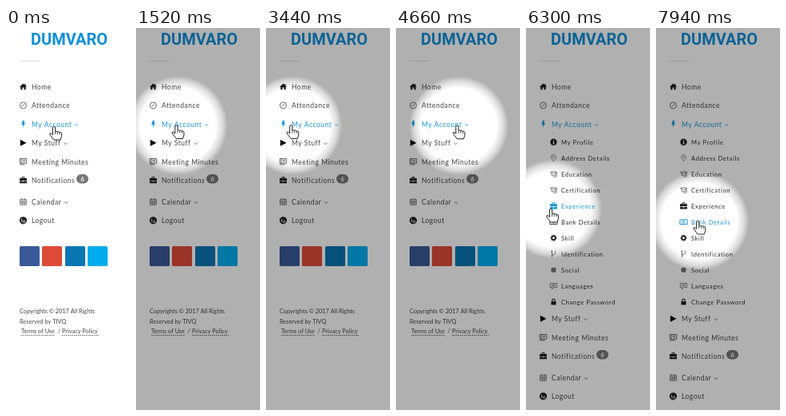
Animation, 155 px wide and 478 px high, one loop 8000 ms. Source, as an HTML page with a canvas:

```html
<!DOCTYPE html>
<html lang="en">
<head>
<meta charset="utf-8">
<title>Side menu tour</title>
<style>
  html, body { margin: 0; width: 100%; height: 100%; overflow: hidden; background: #fff; }
  canvas { display: block; width: 155px; height: 478px; }
</style>
</head>
<body>
<canvas id="stage"></canvas>
<script>
const W = 155, H = 478, LOOP = 8000;
const HOLD = 136.5, FADE_AT = 20;
const BLUE = '#1795d4', INK = '#454545', DARK = '#1c1c1c';
const canvas = document.getElementById('stage');
const ctx = canvas.getContext('2d');
const dpr = window.devicePixelRatio || 1;
canvas.width = W * dpr;
canvas.height = H * dpr;

const clamp = v => Math.max(0, Math.min(1, v));
const smooth = k => k * k * (3 - 2 * k);

// The pointer sways over one menu entry, then travels down the open submenu
const SWAY = { from: 1760, to: 3880, period: 1060, x: 54, reach: 36, fade: 5000, y: 121.5 };
const STOPS = [
  { t: 0, x: 60, y: 123 }, { t: 600, x: 37, y: 120 }, { t: 1360, x: 50, y: 121.5 },
  { t: SWAY.from, x: 90, y: SWAY.y }, { t: SWAY.to, x: 77, y: SWAY.y }, { t: 5350, x: 76, y: 122 },
  { t: 5760, x: 24, y: 135 }, { t: 6300, x: 31, y: 226 }, { t: 6500, x: 34, y: 240 },
  { t: 6990, x: 88, y: 242 }, { t: 7780, x: 45, y: 241 }, { t: LOOP, x: 54, y: 241 }
];

function pointer(t) {
  if (t >= SWAY.from && t < SWAY.to) {
    const s = t - SWAY.from;
    const swing = SWAY.reach * Math.exp(-s / SWAY.fade);
    return { x: SWAY.x + swing * Math.cos(2 * Math.PI * s / SWAY.period), y: SWAY.y };
  }
  const i = STOPS.findIndex(s => s.t > t);
  const a = STOPS[i - 1], b = STOPS[i];
  const k = smooth((t - a.t) / (b.t - a.t));
  return { x: a.x + (b.x - a.x) * k, y: a.y + (b.y - a.y) * k };
}

// Draws a label and returns its right end
function text(s, x, y, font, color, gap = 0) {
  ctx.font = font;
  ctx.letterSpacing = gap + 'px';
  ctx.fillStyle = color;
  ctx.fillText(s, x, y);
  return x + ctx.measureText(s).width;
}

function fill(d, color) { ctx.fillStyle = color; ctx.fill(new Path2D(d)); }
function line(d, color, w = 0.8) {
  ctx.strokeStyle = color;
  ctx.lineWidth = w;
  ctx.stroke(new Path2D(d));
}
function disc(x, y, r, color) {
  ctx.fillStyle = color;
  ctx.beginPath();
  ctx.arc(x, y, r, 0, 7);
  ctx.fill();
}
function ring(x, y, r, color, w = 0.8) {
  ctx.strokeStyle = color;
  ctx.lineWidth = w;
  ctx.beginPath();
  ctx.arc(x, y, r, 0, 7);
  ctx.stroke();
}
function box(x, y, w, h, r, color) {
  ctx.fillStyle = color;
  ctx.beginPath();
  ctx.roundRect(x, y, w, h, r);
  ctx.fill();
}

// Icons are drawn around 0,0
const icons = {
  home: c => fill('M-4.6 .3L0-4 1.8-2.3V-3.6H3V-1.2L4.6 .3H3.2V3.8H1V1H-1V3.8H-3.2V.3Z', c),
  gauge: c => { ring(0, 0, 4, c); line('M-1.6 1.2L2-1.6', c); },
  bolt: c => fill('M-.6-4.5H1.8L.8-1.6H2.6L-1 4.6-.2 .4H-2.2Z', c),
  play: c => fill('M-3.6-4L4 0-3.6 4Z', c),
  board: c => line('M-4.2-3.6H4.2V2.2H-4.2ZM-2.4-3.6V2.2M-.8-1.8H2.8M-.8 0H2.8M-4.2 3.8H2', c),
  bag: c => {
    line('M-1.6-2.4V-3.8H1.6V-2.4', c, 1);
    fill('M-4.5-2.5H4.5V.4H-4.5ZM-4.5 1H-1V1.8H1V1H4.5V3.8H-4.5Z', c);
  },
  calendar: c => line('M-3.8-3H3.8V3.8H-3.8ZM-3.8-1H3.8M-3.8 1.3H3.8M-1.3-1V3.8M1.3-1V3.8M-2-4.2V-2.4M2-4.2V-2.4', c, 0.7),
  exit: c => { disc(0, 0, 4.6, c); line('M-1.8-2V2M.2 .6A1.4 1.4 0 1 0 .3 .5', '#fff', 0.9); },
  info: c => { disc(0, 0, 4.2, c); line('M0-2.7V-1.4M-.9-.5H.1V2.3M-1.1 2.3H1.2', '#fff', 1); },
  pin: c => { line('M0 4.2C-1 2-3 .6-3-1.2A3 3 0 0 1 3-1.2C3 .6 1 2 0 4.2Z', c, 0.7); ring(0, -1.2, 1, c, 0.6); },
  cap: c => line('M-4.3-2.2L0-3.4 4.3-2.2 0-.8ZM-2.4-1.4V1.6H2.6V-1.4M3.7-2V3.4H-1', c, 0.7),
  cash: c => { line('M-4.6-2.8H4.6V2.8H-4.6Z', c, 1); ring(0, 0, 1.3, c, 1); },
  gear: c => {
    ring(0, 0, 2.3, c, 1.7);
    for (let a = 0; a < 6; a += Math.PI / 4) disc(Math.cos(a) * 3.3, Math.sin(a) * 3.3, 0.8, c);
  },
  fork: c => line('M-2-4V4M-2 1.2C1 1.2 2.2 0 2.2-3.6M-3.2-3L-2-4', c, 0.9),
  dot: c => disc(0, 0, 3.2, c),
  bubble: c => line('M-4.2-3.2H4.2V2H0L-2 4V2H-4.2ZM-2.4-1.4H2.4M-2.4 .3H2.4', c, 0.7),
  lock: c => { line('M-1.7-.4V-2A1.7 1.7 0 0 1 1.7-2V-.4', c, 1.1); fill('M-3-.6H3V3.7H-3Z', c); }
};

function icon(name, x, y, color) {
  ctx.save();
  ctx.translate(x, y);
  icons[name](color);
  ctx.restore();
}

const MENU = [
  { icon: 'home', label: 'Home', tint: DARK },
  { icon: 'gauge', label: 'Attendance' },
  { icon: 'bolt', label: 'My Account', tint: BLUE, ink: BLUE, arrow: true },
  { icon: 'play', label: 'My Stuff', tint: '#000', arrow: true },
  { icon: 'board', label: 'Meeting Minutes' },
  { icon: 'bag', label: 'Notifications', tint: DARK, badge: '6' },
  { icon: 'calendar', label: 'Calendar', arrow: true },
  { icon: 'exit', label: 'Logout', tint: DARK }
];
const SUB = [
  ['info', 'My Profile', DARK], ['pin', 'Address Details', '#666'], ['cap', 'Education', '#555'],
  ['cap', 'Certification', '#555'], ['bag', 'Experience', DARK], ['cash', 'Bank Details', INK],
  ['gear', 'Skill', DARK], ['fork', 'Identification', '#555'], ['dot', 'Social', '#777'],
  ['bubble', 'Languages', '#555'], ['lock', 'Change Password', DARK]
];
const ROW = 20, SUB_TOP = 133;
const MENU_FONT = '8.5px Lato, sans-serif';
const SUB_FONT = '7.5px Lato, sans-serif';
const FOOT_FONT = '7.35px Lato, sans-serif';

function drawMenu(shift) {
  MENU.forEach(({ icon: name, label, tint = INK, ink = INK, arrow, badge }, i) => {
    const y = 74 + 23.4 * i + (i > 5 ? 3.5 : 0) + (i > 2 ? shift : 0);
    icon(name, 21.5, y - 0.5, tint);
    const end = text(label, 32, y + 3, MENU_FONT, ink, 0.5);
    if (arrow) line(`M${end + 4} ${y - 0.4}l2 1.8 2-1.8`, ink);
    if (badge) {
      box(88, y - 8, 15, 11.5, 5.7, '#777');
      text(badge, 93.2, y + 0.7, 'bold 8px Lato, sans-serif', '#fff');
    }
  });
}

function drawSub(open, tip) {
  if (!open) return;
  const active = open === 1 && tip.y >= SUB_TOP ? Math.floor((tip.y - SUB_TOP) / ROW) : -1;
  ctx.save();
  ctx.beginPath();
  ctx.rect(0, SUB_TOP, W, SUB.length * ROW * open);
  ctx.clip();
  SUB.forEach(([name, label, tint], i) => {
    const y = SUB_TOP + ROW * (i + 0.5);
    icon(name, 34.5, y - 0.3, i === active ? BLUE : tint);
    text(label, 44, y + 2.8, SUB_FONT, i === active ? BLUE : '#2a2a2a', 0.65);
  });
  ctx.restore();
}

function drawFooter(shift) {
  ['#3b5998', '#dd4b39', '#0976b4', '#00aced'].forEach((color, i) =>
    box(Math.round(17 + i * 28.3), 273 + shift, 25, 25, 1.5, color));
  const put = (s, x, y) => text(s, x, y + shift, FOOT_FONT, INK);
  put('Copyrights © 2017 All Rights', 17, 357);
  put('Reserved by TIVQ', 17, 370);
  put('Terms of Use', 19, 382);
  put('/', 64.5, 382);
  put('Privacy Policy', 70, 382);
  ctx.setLineDash([1.5, 1]);
  line(`M19 ${384.5 + shift}H61M70 ${384.5 + shift}H116`, '#444');
  ctx.setLineDash([]);
}

function drawSpotlight(t, tip) {
  if (t < FADE_AT) return;
  const alpha = 0.31 * clamp(0.4 + t / 260);
  const r = 62 + 60 * (1 - clamp(t / 550)) ** 2;
  const x = tip.x + 2, y = tip.y + 0.5;
  const g = ctx.createRadialGradient(x, y, 0, x, y, r);
  const shade = k => `rgba(0,0,0,${alpha * k})`;
  g.addColorStop(0.76, shade(0));
  g.addColorStop(0.9, shade(0.45));
  g.addColorStop(1, shade(1));
  ctx.fillStyle = g;
  ctx.fillRect(0, 0, W, H);
}

function drawHand(tip) {
  ctx.save();
  ctx.translate(tip.x, tip.y);
  const d = 'M-1.6 1Q0-1 1.6 1V6.6Q3 5.2 4.3 6.9 6 5.7 7 7.6 9 6.7 9.5 9V12.5L8 17H0L-5 10.7Q-6 8.2-3.5 8.7L-1.6 10.5Z';
  fill(d, '#fff');
  ctx.lineJoin = 'round';
  line(d, '#222', 1);
  line('M1.6 6.6V10M4.3 6.9V10M7 7.6V10.4', '#222');
  ctx.restore();
}

function draw(now) {
  const clock = now % LOOP;
  // The picture advances at a steady cadence once the fade begins
  const t = clock < FADE_AT ? 0 : FADE_AT + Math.floor((clock - FADE_AT) / HOLD) * HOLD;
  const tip = pointer(t);
  const open = clamp((t - 4760) / 320);
  const shift = SUB.length * ROW * open;

  ctx.setTransform(dpr, 0, 0, dpr, 0, 0);
  ctx.fillStyle = '#fff';
  ctx.fillRect(0, 0, W, H);
  text('DUMVARO', 31, 21, 'bold 20px Roboto, sans-serif', '#0c8fd9');
  line('M17 41.5H42', '#ddd', 1);
  drawMenu(shift);
  drawSub(open, tip);
  drawFooter(shift);
  drawSpotlight(t, tip);
  drawHand(tip);
}

const start = performance.now();
function loop() {
  draw(performance.now() - start);
  requestAnimationFrame(loop);
}
loop();
</script>
</body>
</html>
```
